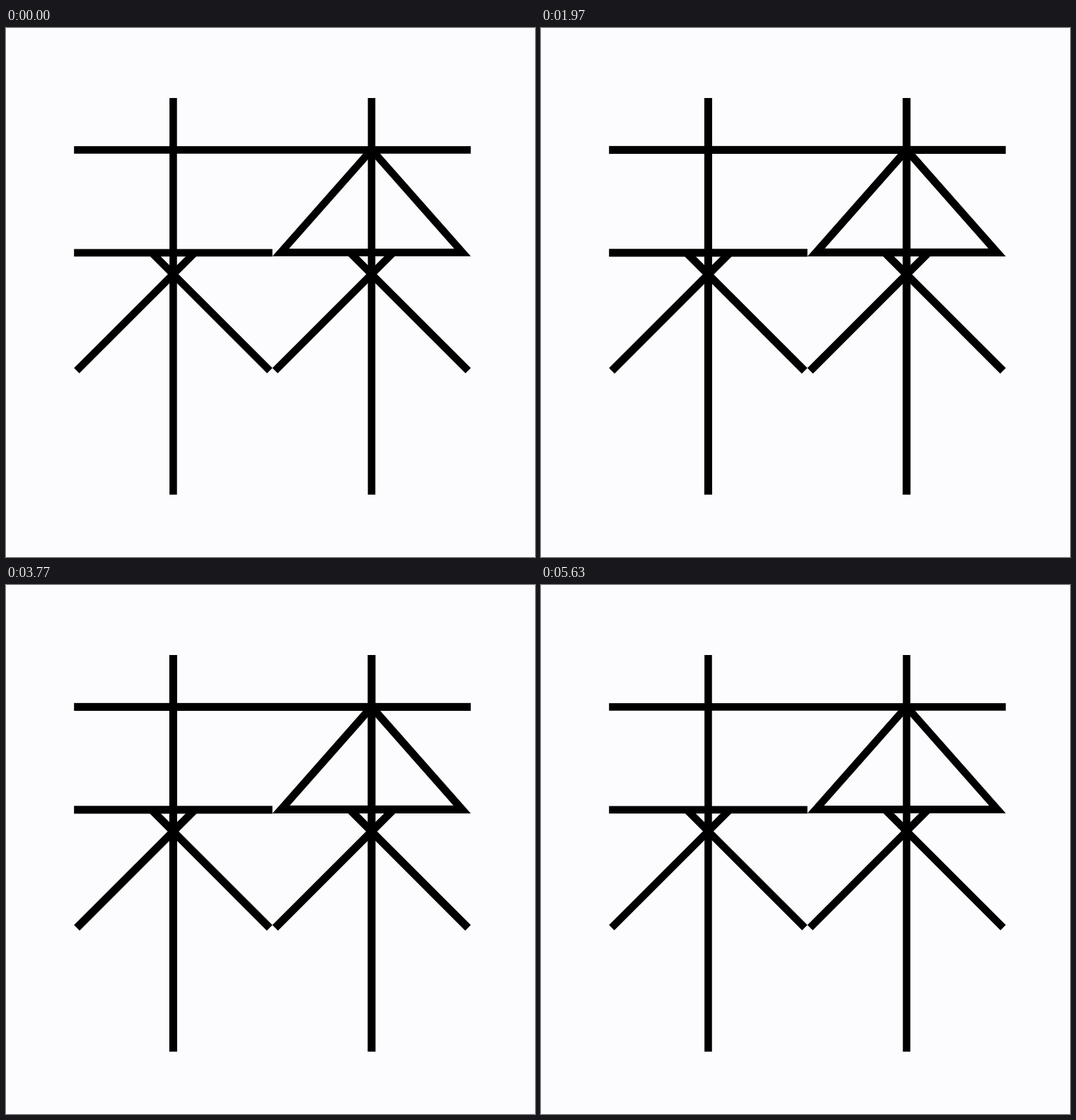
An HTML page with a canvas for the animation above (5.76 s loop, 748 px wide and 748 px high).

```html
<!DOCTYPE html>
<html lang="en">
<head>
<meta charset="utf-8">
<title>Glyph weight</title>
<style>
html, body { margin: 0; width: 100%; height: 100%; overflow: hidden; background: #fcfcfe; }
canvas { display: block; }
</style>
</head>
<body>
<canvas id="stage" width="748" height="748"></canvas>
<script>
const ctx = document.getElementById('stage').getContext('2d');

const LOOP = 5760, HOLD = 130, STEPS = 166, STEP_RATE = 0.03;
const SWING = 27, SWINGS = 6, LEAD = 0.3;
const THIN = 10.6, THICK = 75;

const LEFT = 96.2, MID = 376.7, RIGHT = 657.2;
const STEMS = [236.45, 516.95];
const TOP = 99, BOTTOM = 659.8;
const BAR_1 = 172.4, BAR_2 = 317.85, FOOT = 480.8;

// Cubic ease-in-out with control points (.42, 0) and (.58, 1)
function ease(x) {
  let lo = 0, hi = 1;
  for (let i = 0; i < 24; i++) {
    const s = (lo + hi) / 2;
    if (s * (1.26 - 0.78 * s + 0.52 * s * s) < x) lo = s; else hi = s;
  }
  return lo * lo * (3 - 2 * lo);
}

function boldness(ms) {
  const t = Math.floor((ms % LOOP) / 10) * 10;
  const step = t < HOLD ? 0 : Math.min(STEPS, Math.floor((t - HOLD) * STEP_RATE + 1e-6) + 1);
  const swing = Math.min(SWINGS, Math.max(0, (step - LEAD) / SWING)) % 2;
  return ease(swing > 1 ? 2 - swing : swing);
}

function trace(points) {
  points.forEach(([x, y], i) => i ? ctx.lineTo(x, y) : ctx.moveTo(x, y));
  ctx.closePath();
}

function fill(...shapes) {
  ctx.beginPath();
  shapes.forEach(trace);
  ctx.fill('evenodd');
}

// Leg from the underside of the crossbar down to a foot corner; dir is +1 inward to the right
function leg(x, dir, w, cut) {
  const k = w / Math.SQRT2;
  const reach = FOOT - cut;
  fill([
    [x, FOOT],
    [x + dir * k, FOOT + k],
    [x + dir * (reach + 2 * k), cut],
    [x + dir * reach, cut]
  ]);
}

function triangle(w, bold, base) {
  const apex = 164 - 3 * bold;
  const half = (RIGHT - MID) / 2, height = base - apex;
  const radius = half * height / (half + Math.hypot(half, height));
  const cx = STEMS[1], cy = base - radius;
  const outer = [[MID, base], [RIGHT, base], [cx, apex]];
  const scale = 1 - w / radius;
  if (scale <= 0) return fill(outer);
  fill(outer, outer.map(([x, y]) => [cx + (x - cx) * scale, cy + (y - cy) * scale]));
}

function draw(bold) {
  const w = THIN + (THICK - THIN) * bold;
  const base = BAR_2 + w / 2 - 0.5;
  ctx.clearRect(0, 0, 748, 748);
  ctx.fillStyle = '#000';
  for (const x of STEMS) ctx.fillRect(x - w / 2, TOP, w, BOTTOM - TOP);
  ctx.fillRect(LEFT, BAR_1 - w / 2, RIGHT - LEFT, w);
  ctx.fillRect(LEFT, BAR_2 - w / 2, MID - LEFT, w);
  triangle(w, bold, base);
  for (const x of [LEFT, MID]) {
    leg(x, 1, w, base - 1);
    leg(x + MID - LEFT, -1, w, base - 1);
  }
}

const start = performance.now();
function tick() {
  draw(boldness(performance.now() - start));
  requestAnimationFrame(tick);
}
tick();
</script>
</body>
</html>
```
